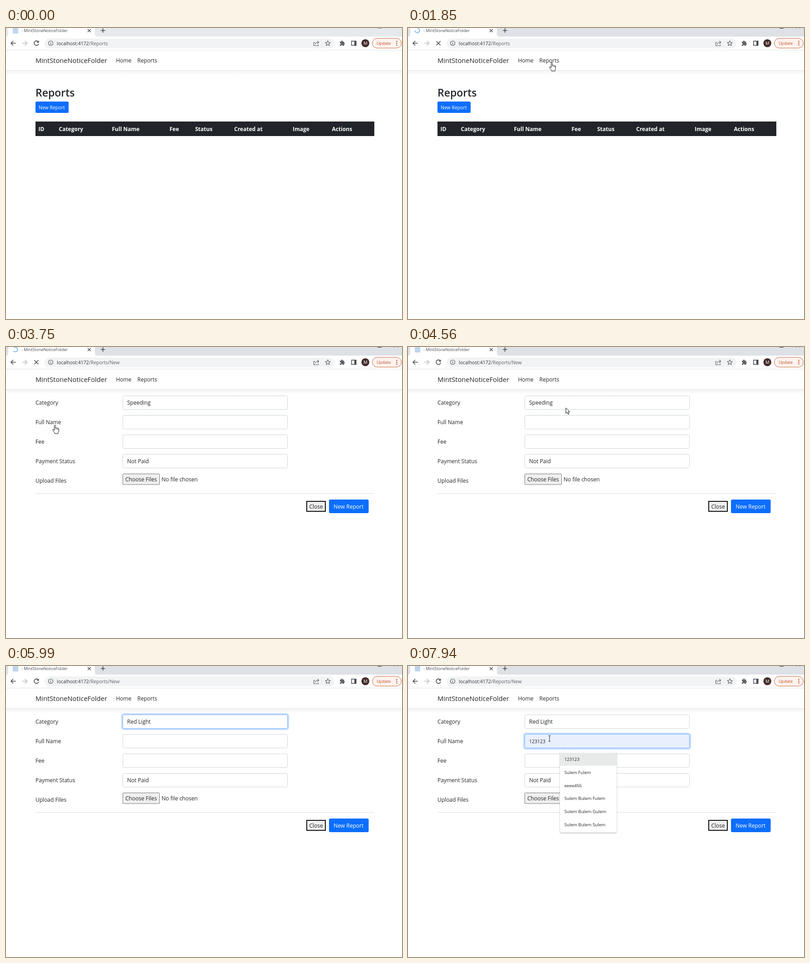
An HTML page for the animation above (8000 ms loop, 873 by 641 pixels).

```html
<!DOCTYPE html>
<html lang="en">
<head>
<meta charset="utf-8">
<title>Reports</title>
<style>
  html, body { margin: 0; width: 100%; height: 100%; overflow: hidden; background: #fff; }
  svg { display: block; width: 873px; height: 641px; }
  text { font-family: "Open Sans", "Noto Sans", sans-serif; fill: #212529; white-space: pre; }
</style>
</head>
<body>
<svg id="stage" viewBox="0 0 873 641" xmlns="http://www.w3.org/2000/svg"></svg>
<script>
const LOOP = 8000;
const BRAND = "MintStoneNoticeFolder";
const HOST = "localhost:4172";

const text = (x, y, s, size = 12, attrs = "") =>
  `<text x="${x}" y="${y}" font-size="${size}" ${attrs}>${s}</text>`;
const rect = (x, y, w, h, fill, attrs = "") =>
  `<rect x="${x}" y="${y}" width="${w}" height="${h}" fill="${fill}" ${attrs}/>`;
const line = (d, color, width = 1.5, attrs = "") =>
  `<path d="${d}" fill="none" stroke="${color}" stroke-width="${width}" ${attrs}/>`;
const group = (id, body, attrs = "") => `<g id="${id}" ${attrs}>${body}</g>`;
const field = y => rect(257.5, y + .5, 363, 30, "#fff", 'rx="3" stroke="#ced4da"');
const focused = (y, fill = "#fff") =>
  rect(255.5, y - 1.5, 367, 34, "none", 'rx="4.5" stroke="#c2dbfe" stroke-width="3"') +
  rect(257.5, y + .5, 363, 30, fill, 'rx="3" stroke="#86b7fe"');

function browserBar() {
  const ink = "#5f6368", dark = "#46494d";
  return rect(0, 0, 873, 19, "#dee1e6", 'id="strip"') +
    '<path d="M0 19Q5 19 5 13V0H196V13Q196 19 201 19Z" fill="#fff"/>' +
    rect(15, 0, 12, 12, "#bfd5ee", 'id="favicon"') +
    group("spinner", line("M20.5 .5A5 5 0 1 1 15.5 5.5", "#6aaee8", 1.6)) +
    text(34, 9, "- " + BRAND, 9, 'style="fill:#45494d"') +
    line("M180 2.5L187 9M187 2.5L180 9", dark, 1.4) +
    line("M209 5.5H218.5M213.7 .8V10.3", dark, 1.6) +
    group("controls", line("M819 .3H828M855.5 0L856.3 .6M863.5 0L862.7 .6", "#111", 1.2)) +
    rect(0, 19, 873, 30, "#fff") +
    rect(0, 48, 873, 1, "#dfe1e4") +
    rect(85, 23, 639, 22, "#f1f3f4", 'rx="11"') +
    line("M21.5 33.5H11M16 28.5L11 33.5L16 38.5", dark, 1.6) +
    line("M36 33.5H46.5M41.5 28.5L46.5 33.5L41.5 38.5", "#babcbe", 1.5) +
    group("reload", line("M71 30.2A5 5 0 1 0 72 34.6", dark, 1.6) +
      `<path d="M72.5 27.5V32.6H67.4Z" fill="${dark}"/>`) +
    group("stop", line("M62.5 29L71.5 38M71.5 29L62.5 38", dark, 1.6)) +
    `<circle cx="98.5" cy="33.5" r="5" fill="none" stroke="${ink}" stroke-width="1.2"/>` +
    line("M98.5 32.8V36.5M98.5 30.4V31.7", ink, 1.3) +
    `<text x="112" y="37.5" font-size="10.5" style="fill:#303438">${HOST}<tspan id="path" fill="#5f6368"></tspan></text>` +
    line("M681.5 31.5H678.5V39H688.5V36.5", ink, 1.2) +
    line("M681.5 36Q682.5 31.5 689.5 31.5M686.5 28.5L689.5 31.5L686.5 34.5", ink, 1.2) +
    line("M709.5 28L711.1 31.8L715.2 32.1L712 34.8L713.1 38.8L709.5 36.6L705.9 38.8L707 34.8L703.8 32.1L707.9 31.8Z", ink, 1.2, 'stroke-linejoin="round"') +
    `<path d="M736 30H739Q739 27.5 740.6 27.5T742.3 30H745.3V33Q747 33 747 34.7T745.3 36.3V39.3H742Q742 37.2 740.6 37.2T739 39.3H736V36.2Q738 36.2 738 34.7T736 33Z" fill="${ink}"/>` +
    rect(761.8, 28.8, 10, 9.6, "none", `stroke="${dark}" stroke-width="1.5"`) +
    rect(768, 29, 4, 9, dark) +
    '<circle cx="792.2" cy="33.5" r="8.7" fill="#432c2b"/>' +
    text(792.2, 37, "M", 9.5, 'text-anchor="middle" style="fill:#fff"') +
    rect(807.5, 22.8, 64, 21.4, "#fdf3ef", 'rx="10.7" stroke="#c9663f"') +
    text(817, 37, "Update", 9.1, 'style="fill:#bd4d22"') +
    [29.5, 33.5, 37.5].map(y => `<circle cx="861.5" cy="${y}" r="1.2" fill="#bd4d22"/>`).join("");
}

function navBar() {
  return rect(0, 94, 873, 10, "url(#shade)") +
    rect(0, 49, 873, 44, "#fff") +
    rect(0, 93, 873, 1, "#e3e6e9") +
    text(65, 77.3, BRAND, 14.7) +
    text(242.5, 76, "Home") +
    text(289.5, 76, "Reports");
}

function listPage() {
  const heads = { ID: 71.5, Category: 116.5, "Full Name": 233.5, Fee: 360.5,
    Status: 417, "Created at": 503, Image: 632, Actions: 718.5 };
  return text(65, 151, "Reports", 23, 'font-weight="600"') +
    rect(65, 162, 73, 25, "#0d6efd", 'id="newButton" rx="2.5"') +
    text(72, 179, "New Report", 10.5, 'style="fill:#fff"') +
    rect(65, 206, 747, 32, "#212529") +
    Object.entries(heads).map(([s, x]) =>
      text(x, 227, s, 12, 'font-weight="700" style="fill:#fff"')).join("");
}

function formPage() {
  const labels = ["Category", "Full Name", "Fee", "Payment Status", "Upload Files"];
  return labels.map((s, i) => text(65, 127 + 43.1 * i, s)).join("") +
    [107, 150, 193, 236].map(field).join("") +
    group("selectFocus", focused(107)) +
    group("nameFocus", focused(150)) +
    group("nameFilled", focused(150, "#e8f0fe") + text(267, 170, "123123", 10.5)) +
    rect(267.2, 157.5, 1, 16.5, "#222", 'id="caret"') +
    text(267, 127, "Speeding", 12, 'id="category"') +
    text(267, 256, "Not Paid") +
    rect(257.5, 279.5, 81, 23.5, "#efefef", 'rx="1" stroke="#767676"') +
    text(263, 296, "Choose Files") +
    text(343, 296, "No file chosen") +
    rect(65, 322, 747, 1, "#dcdddf") +
    rect(663, 340, 41, 22, "#efefef", 'stroke="#111" stroke-width="2"') +
    text(668.5, 356, "Close") +
    rect(712, 336, 87.5, 30, "#0d6efd", 'rx="3"') +
    text(722.3, 356, "New Report", 12, 'style="fill:#fff"') +
    group("options",
      rect(257.5, 137.5, 363, 36.5, "#fff", 'stroke="#767b80" filter="url(#soft)"') +
      rect(258, 138, 362, 18, "#1e90ff", 'id="optionMark"') +
      text(267, 151.5, "Speeding", 12, 'id="option0"') +
      text(267, 169.5, "Red Light", 12, 'id="option1"')) +
    group("suggest", suggestions());
}

function suggestions() {
  const names = ["123123", "Sulem Fulem", "eeee456", "Sulem Bulem Fulem",
    "Sulem Bulem Gulem", "Sulem Bulem Sulem"];
  return '<path d="M335 191Q335 189 337 189H346L352 182.5L358 189H458Q460 189 460 191V364.5Q460 366.5 458 366.5H337Q335 366.5 335 364.5Z" fill="#fff" filter="url(#soft)"/>' +
    rect(335, 191, 125, 28.5, "#e8eae9", 'id="suggestMark"') +
    names.map((s, i) => text(344.7, 209 + 28.75 * i, s, 9.7)).join("");
}

function pointers() {
  const ink = 'fill="#fff" stroke="#111" stroke-width="1" stroke-linejoin="round"';
  return '<circle id="pulse" r="10" fill="#ffd800" opacity=".5"/>' +
    group("arrow", `<path d="M0 0V12.4L2.9 9.7L5 14.4L7 13.5L5 8.9H8.8Z" ${ink}/>`) +
    group("hand", `<path d="M-1.5 1.2Q-1.5 0 -.2 0T1.2 1.2V6Q3.8 5.2 4.1 6.7Q6.2 6 6.7 7.4Q8.3 7.1 8.3 9V13Q8.3 15 7 16.5V18.8H-.5V17.2L-4.6 12Q-6 9.8 -4.5 9.4Q-3.2 9.2 -1.5 11.5Z" ${ink}/>` +
      line("M1.2 6V9.3M4.1 7V9.7M6.7 8V10", "#111", .8)) +
    group("beam", line("M-2.5 -6.5H-1L0 -5.7L1 -6.5H2.5M0 -5.7V5.2M-2.5 6H-1L0 5.2L1 6H2.5", "#222", 1));
}

const stage = document.getElementById("stage");
stage.innerHTML = `<defs>
  <linearGradient id="shade" x2="0" y2="1"><stop stop-color="#f3f3f4"/><stop offset="1" stop-color="#fff"/></linearGradient>
  <filter id="soft" x="-10%" y="-20%" width="120%" height="150%"><feDropShadow dx="0" dy="1.5" stdDeviation="1.5" flood-opacity=".3"/></filter>
  </defs>` + rect(0, 0, 873, 641, "#fff") + browserBar() +
  group("list", listPage()) + navBar() + group("form", formPage()) + pointers();

const el = {};
stage.querySelectorAll("[id]").forEach(n => el[n.id] = n);
const show = (id, on) => el[id].setAttribute("display", on ? "inline" : "none");
const within = (t, a, b) => t >= a && t < b;

// time, x, y, pointer shape until the next stop
const stops = [
  [0, 511, 362, ""], [480, 511, 362, "arrow"], [680, 345, 185, "arrow"],
  [790, 289, 105, "arrow"], [870, 344, 85, "arrow"], [1060, 344, 85, "arrow"],
  [1110, 317, 81, "hand"], [1300, 317, 81, "hand"], [1360, 317, 76, "hand"],
  [1980, 317, 76, "hand"], [2040, 286, 90, "arrow"], [2110, 268, 100, "arrow"],
  [2400, 125, 165, "hand"], [2490, 108, 172, "hand"], [3920, 108, 172, "hand"],
  [4000, 128, 174, "arrow"], [4180, 248, 174, "arrow"], [4500, 348, 134, "arrow"],
  [4570, 348, 134, "arrow"], [4690, 347, 123, "arrow"], [5080, 347, 123, "arrow"],
  [5380, 314, 155, "arrow"], [5990, 312, 160, ""], [6180, 312, 160, "beam"],
  [LOOP, 312, 160, "beam"]
];
const clicks = [[1300, 1480], [3440, 3600], [4870, 5010], [5940, 5990], [6370, 6450]];

function pointerAt(t) {
  const i = stops.findIndex(s => s[0] > t) - 1;
  const [a, b] = [stops[i], stops[i + 1]];
  const k = (t - a[0]) / (b[0] - a[0]);
  // the last leg before hiding stays still
  if (!b[3]) return [a[1], a[2], a[3]];
  return [a[1] + (b[1] - a[1]) * k, a[2] + (b[2] - a[2]) * k, a[3]];
}

function draw(t) {
  const onForm = t >= 3750;
  const loading = within(t, 1420, 1960) || within(t, 3560, 3900);
  const active = t >= 1300;
  el.strip.setAttribute("fill", active ? "#dee1e6" : "#e7eaed");
  el.controls.setAttribute("opacity", active ? 1 : .45);
  show("favicon", !loading);
  show("spinner", loading);
  show("reload", !loading);
  show("stop", loading);
  el.spinner.setAttribute("transform", `rotate(${(t - 1850) * .36} 20.5 5.5)`);
  el.path.textContent = onForm ? "/Reports/New" : "/Reports";
  show("list", !onForm);
  show("form", onForm);
  el.newButton.setAttribute("fill", t >= 2400 ? "#0b5ed7" : "#0d6efd");

  const second = t >= 5750;
  el.category.textContent = t >= 5940 ? "Red Light" : "Speeding";
  show("selectFocus", within(t, 4930, 6400));
  show("options", within(t, 4990, 5940));
  el.optionMark.setAttribute("y", second ? 156 : 138);
  el.option0.style.fill = second ? "#212529" : "#fff";
  el.option1.style.fill = second ? "#fff" : "#212529";

  show("nameFocus", within(t, 6400, 7940));
  show("nameFilled", t >= 7940);
  show("caret", within(t, 6400, 6870) || within(t, 7360, 7940));
  show("suggest", t >= 6450);
  show("suggestMark", t >= 7940);

  const [x, y, shape] = pointerAt(t);
  for (const id of ["arrow", "hand", "beam"]) {
    show(id, id === shape);
    el[id].setAttribute("transform", `translate(${x} ${y})`);
  }
  show("pulse", clicks.some(([a, b]) => within(t, a, b)));
  el.pulse.setAttribute("cx", x);
  el.pulse.setAttribute("cy", y);
}

function tick() {
  draw(performance.now() % LOOP);
  requestAnimationFrame(tick);
}
tick();
</script>
</body>
</html>
```
